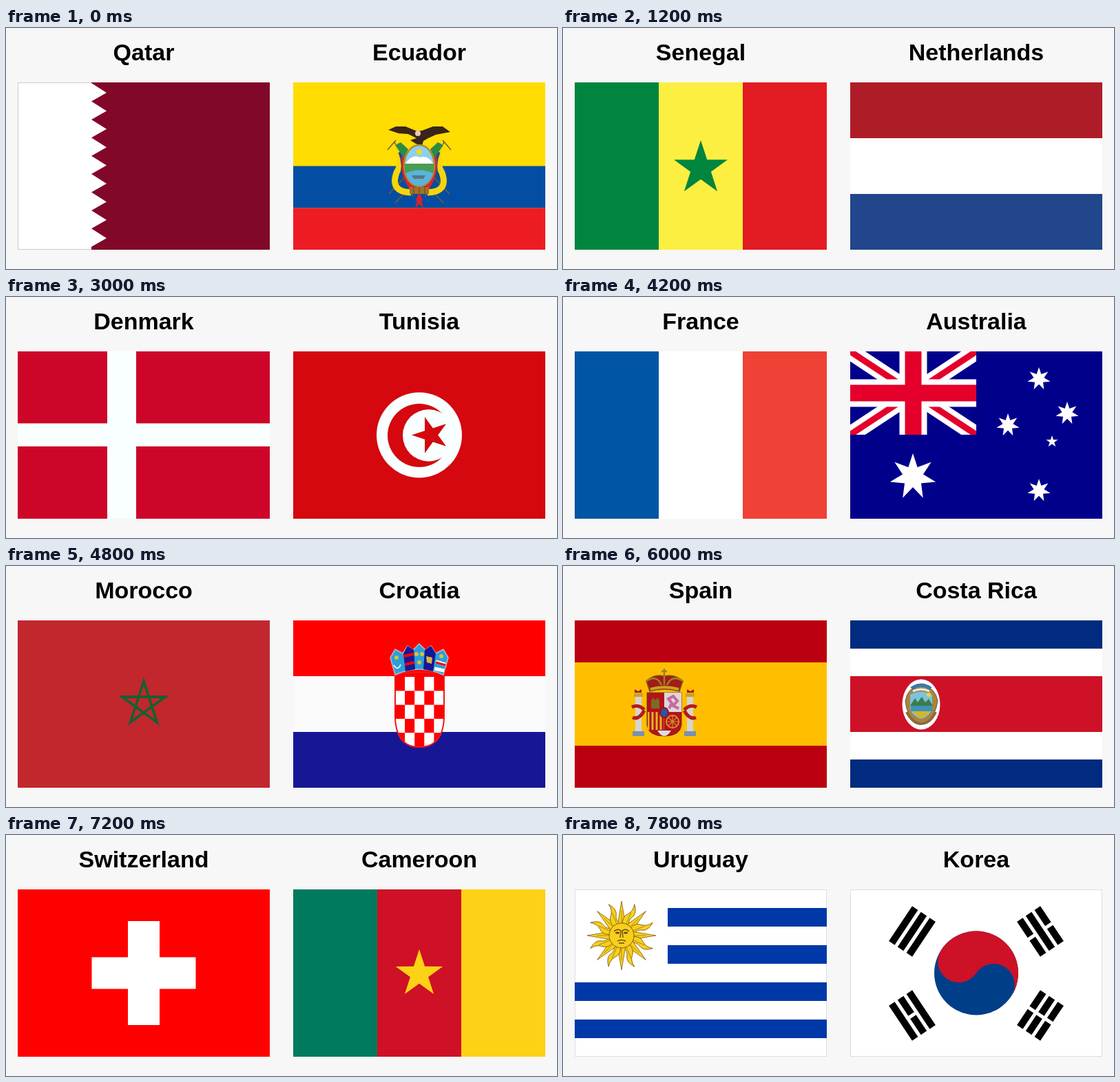
Recreate the animation shown at these times as an HTML page. Size 800x350 px, loop 8000 ms.

```html
<!DOCTYPE html>
<html lang="en">
<head>
<meta charset="utf-8">
<title>Flag pairs</title>
<style>
html, body { margin: 0; width: 100%; height: 100%; overflow: hidden; background: #f7f7f7; }
#stage { display: block; }
text { font: bold 34px "Liberation Sans", Arial, sans-serif; text-anchor: middle; }
</style>
</head>
<body>
<svg id="stage" width="800" height="350" viewBox="0 0 800 350"></svg>
<script>
const W = 366, H = 243, SLIDE = 600, LOOP = 8000;

const rect = (x, y, w, h, fill) => `<rect x="${x}" y="${y}" width="${w}" height="${h}" fill="${fill}"/>`;
const oval = (x, y, rx, ry, fill, stroke = 'none', w = 1) =>
  `<ellipse cx="${x}" cy="${y}" rx="${rx}" ry="${ry}" fill="${fill}" stroke="${stroke}" stroke-width="${w}"/>`;
const circle = (x, y, r, fill, stroke, w) => oval(x, y, r, r, fill, stroke, w);
const path = (d, fill, stroke = 'none', w = 1) => `<path d="${d}" fill="${fill}" stroke="${stroke}" stroke-width="${w}"/>`;
const line = (d, stroke, w) => path(d, 'none', stroke, w);
const group = (transform, s) => `<g transform="${transform}">${s}</g>`;
const mirror = (cx, s) => s + group(`translate(${2 * cx} 0) scale(-1 1)`, s);
const repeat = (n, f) => Array.from({ length: n }, (_, i) => f(i)).join('');
const fill = color => rect(0, 0, W, H, color);
const rows = (...c) => c.map((f, i) => rect(0, i * H / c.length, W, H / c.length + .2, f)).join('');
const cols = (...c) => c.map((f, i) => rect(i * W / c.length, 0, W / c.length + .2, H, f)).join('');
const edge = (color = '#ddd') => `<rect x=".5" y=".5" width="${W - 1}" height="${H - 1}" fill="none" stroke="${color}"/>`;
// Emblems are drawn in stage coordinates of the left or right flag.
const onLeft = s => group('translate(-17 -79)', s);
const onRight = s => group('translate(-417 -79)', s);

function star(x, y, r, color, { turn = -90, n = 5, inner = .382 } = {}) {
  const pts = Array.from({ length: 2 * n }, (_, i) => {
    const a = (turn + i * 180 / n) * Math.PI / 180, k = i % 2 ? r * inner : r;
    return `${(x + k * Math.cos(a)).toFixed(2)},${(y + k * Math.sin(a)).toFixed(2)}`;
  });
  return `<polygon points="${pts.join(' ')}" fill="${color}"/>`;
}

function sun(x, y, scale, color, ink) {
  const rays = ['M-6-15L0-50L6-15Z', 'M-5-16Q-10-26-3-33Q2-39 0-49Q9-38 4-30Q0-24 5-16Z'];
  const face = mirror(0, line('M-2 3L-1-7Q-6-11-11-6', ink, 1.4) + oval(-6, -4, 3, 1.6, ink)) +
    line('M-6 8Q0 5 6 8M-4 11H4', ink, 1.6);
  return group(`translate(${x} ${y}) scale(${scale})`,
    repeat(16, i => group(`rotate(${i * 22.5})`, path(rays[i % 2], color, ink, .7) + line('M0-16V-36', ink, .5))) +
    circle(0, 0, 18, color, ink, .8) + face);
}

const qatarTeeth = 'M366 0H107V1' + repeat(9, i => `L129 ${15 + 26.4 * i}L107 ${27.5 + 26.4 * i}`) + 'V243H366Z';

const ecuadorArms = mirror(600,
    line('M564 165L591 245M554 177L566 163M556 241L590 205M565 254L592 226', '#7a5a34', 1.5) +
    line('M567 168Q579 190 567 210Q557 238 588 239', '#f6d60a', 9) +
    line('M572 180Q580 200 573 218', '#174a94', 5) +
    line('M578 186Q575 218 593 236', '#e0222a', 7) +
    path('M565 170L573 166L584 176L578 189Z', '#2c8a43') + path('M600 238L594 262L605 250Z', '#d8222a')) +
  path('M555 148L566 143L580 143L597 150L604 149L620 143L634 143L645 151L624 155L613 160L606 164L604 171L595 168L587 163L596 160L584 154L570 153Z', '#3a2518') +
  circle(598, 153, 4, '#e9c9bd') +
  oval(600, 200, 22, 30, '#8bd0ee', '#b08a35', 2.5) + circle(600, 180, 4, '#f8d722') +
  path('M579 198Q590 182 601 188Q613 184 621 198Z', '#fff') + path('M579 197H621Q622 211 617 217H583Q578 211 579 197Z', '#4a9c55') +
  path('M580 211Q600 202 620 211Q614 229 600 229Q586 229 580 211Z', '#56b5dd') + path('M589 214H609L606 219H592Z', '#60717d') +
  rect(586, 231, 28, 10, '#a0722c') + line('M592 231V241M600 231V241M608 231V241', '#69471d', 1);

const dragonTail = 'M666 211Q706 208 706 188Q704 172 690 172Q678 174 680 186Q688 193 697 184Q711 178 715 152';
const dragon = line(dragonTail, '#400', 9) + line(dragonTail, '#d30808', 7) + [
  'M721 131L725 174L715 161L694 166Z',
  'M540 147L502 149L483 136L489 156L503 152L540 152Z',
  'M578 228L630 220Q645 235 625 250L608 262L627 281L610 276L603 286L594 275L583 288V275L568 280L580 267L570 264L596 261L606 246Q580 245 578 228Z',
  'M635 205Q690 203 702 240L686 236Q694 250 688 264L704 285L690 277L684 289L674 277L660 290L662 276L650 278L660 266L652 263L676 260Q678 245 660 240Q630 235 635 205Z',
  'M540 218L574 232Q560 248 546 254L540 266L552 284L538 277L532 284L522 275L512 289L511 276L497 280L508 268L497 267L530 265L519 252L530 228Z',
  'M503 134L516 131L531 123L548 122L556 114L555 121L566 111L565 119L574 116L570 126L575 131L567 134L574 143L569 146L576 156L570 159L577 169L571 172L578 182L576 189L640 196Q670 202 680 215L655 230Q628 222 608 236L560 242Q530 238 532 208Q550 190 550 168Q546 152 536 157L540 147L528 142L505 143Z',
  'M542 231Q508 232 496 209L482 219L487 199L481 187L480 173L487 184L491 161L496 183L505 168L501 194Q508 207 524 209L542 198Z',
  'M574 190L590 186L601 150Q620 130 650 115L647 128Q665 128 694 121Q676 132 674 150L684 151Q662 157 660 180Q646 176 645 196Q632 190 626 210L578 214Z'
].map(d => path(d, '#d30808', '#400', 1.4)).join('') +
  line('M590 187L648 128M592 190L675 150M594 195L660 180M597 200L645 196M530 132L542 130M552 158L567 150M553 168L569 162M553 178L571 174M548 188L572 184M538 204L574 195M536 216L572 210M540 228L574 218M575 236Q590 215 608 222M610 232Q622 236 616 244M655 225Q680 222 688 238M520 212L516 229M507 206L500 214M555 250L545 240M620 250L608 240M688 248L674 245', '#400', 1.3);

const checks = repeat(25, i => i % 2 ? rect(565 + i % 5 * 14.1, 161 + Math.floor(i / 5) * 20.3, 14.1, 20.3, '#fff') : '');
const shield = 'M565 158Q600 150 636 158V221Q634 263 600 263Q567 263 565 221Z';
const croatiaArms = `<clipPath id="shield"><path d="${shield}"/></clipPath>` + path(shield, '#f00') +
  `<g clip-path="url(#shield)">${checks}</g>` + line(shield, '#f01818', 2) +
  path('M565 158L558 133L565 121L576 127L583 116L591 122L600 113L609 122L617 116L624 127L635 121L642 133L635 158Q600 142 565 158Z', '#2a9fdc', '#b8b8c8', 1.5) +
  path('M577 127L583 116L592 122L594 150L580 153Z', '#171796') + path('M608 122L617 116L624 127L620 153L606 150Z', '#171796') +
  line('M577 131L592 128M579 143L593 140', '#f00', 4) + line('M624 139L638 143M622 149L636 152', '#fff', 5) + line('M624 140L638 144', '#e00', 3) +
  [[567, 133], [596, 128], [604, 128], [600, 140], [632, 131]].map(([x, y]) => circle(x, y, 3, '#d9c13a')).join('') +
  line('M563 144Q569 153 573 143', '#e8eef4', 2) + path('M610 131L619 133L618 142L611 140Z', '#d9b53a');

const spainArms = mirror(147,
    rect(105, 190, 9, 50, '#d5d5d0') + rect(103, 185, 13, 5, '#c9a227') + rect(101, 240, 17, 7, '#7b8fb0') +
    path('M104 184V179L109 182L114 179V184Z', '#b01818') +
    line('M100 205Q110 200 118 209M118 210Q110 224 101 220', '#b21c1c', 5)) +
  path('M122 184H172V231Q170 247 147 247Q124 247 122 231Z', '#b5121b', '#6b3a18') +
  rect(147, 184, 25, 28, '#ddd6dc') + rect(123, 212, 24, 26, '#e6b422') +
  line('M127 212V240M133 212V243M139 212V245M145 212V246', '#b5121b', 3) +
  path('M128 207V195L131 191L134 195L137 191L140 195V207Z', '#7d6a25') + line('M154 207L158 199L153 193L160 189L166 196L160 203L168 207', '#c9679c', 4) +
  circle(159, 226, 9, 'none', '#d0902c', 2) + line('M150 226H168M159 217V235M153 220L165 232M153 232L165 220', '#d0902c', 1.2) +
  oval(147, 213, 6, 7, '#2c55a8', '#8c1717', 2) + path('M137 239H157Q147 255 137 239Z', '#ddd') +
  path('M126 182L121 167Q133 156 147 160Q161 156 174 167L169 182Q147 176 126 182Z', '#a31c18', '#805b18', 1.5) +
  line('M127 179Q147 173 168 179', '#c9a227', 4) + line('M121 167Q136 157 143 173M174 167Q158 157 151 173M147 173V149M143 153H151', '#9b8026', 2.5);

const costaRicaArms = oval(520, 201, 27.5, 36.5, '#fff') +
  path('M497 196Q500 176 520 173Q541 176 544 196Q541 218 527 228H513Q499 218 497 196Z', '#a88443', '#70582f') +
  path('M504 187Q520 178 536 187V207Q533 218 520 222Q507 218 504 207Z', '#7fc2dd') +
  path('M504 203L511 192L515 198L521 190L526 198L531 193L537 203Z', '#3b7c4d') + rect(505, 203, 31, 8, '#3d94b8') +
  path('M506 211H535L520 222Z', '#d5b62d') + circle(531, 187, 3, '#f2d43a') +
  line('M506 178Q520 168 534 178', '#3977ad', 5) + line('M508 182Q520 176 532 182', '#e9eef0', 3) +
  line('M499 212Q508 229 520 229Q533 229 541 212', '#8a6b38', 4);

const leaf = mirror(600, path('M600.5 117L591 139Q590 142 587 141L576 139L582 178Q582 185 577 181L565 164L562 173Q561 175 558 174L543 172L548 190Q549 194 546 196L541 204L567 228Q571 232 570 237L568 249L595 245Q599 245 598.7 249L598 285H600.5Z', '#f00'));

const trigrams = [[-93, -61, 33.7, '000'], [93, -61, -33.7, '101'], [-93, 61, -33.7, '010'], [93, 61, 33.7, '111']]
  .map(([x, y, turn, bars]) => group(`translate(${183 + x} ${122 + y}) rotate(${turn})`,
    [...bars].map((b, i) => {
      const left = -20.4 + 15.3 * i;
      return +b ? rect(left, -30.5, 10.2, 28, '#000') + rect(left, 2.5, 10.2, 28, '#000') : rect(left, -30.5, 10.2, 61, '#000');
    }).join(''))).join('');

const unionJack = rect(0, 0, 183, 121, '#00008b') + `<svg width="183" height="121">` +
  line('M0 0L183 121M183 0L0 121', '#fff', 24) + line('M0 0L183 121M183 0L0 121', '#e4002b', 9) +
  line('M91.5 0V121M0 60.5H183', '#fff', 40) + line('M91.5 0V121M0 60.5H183', '#e4002b', 24) + '</svg>';

const flags = {
  Qatar: fill('#fff') + edge('#ccc') + path(qatarTeeth, '#820829'),
  Ecuador: fill('#fd0') + rect(0, 121.5, W, 61, '#034ea2') + rect(0, 182.5, W, 60.5, '#ed1c24') + onRight(ecuadorArms),
  England: fill('#fff') + edge() + rect(158.7, 0, 48.6, H, '#ce1124') + rect(0, 97.2, W, 48.6, '#ce1124'),
  Iran: rows('#239f40', '#fff', '#da0000') +
    repeat(22, i => line(`M${i * 17 + 2} 73v6h12v-6M${i * 17 + 8} 72v7M${i * 17 + 2} 170v-6h12v6M${i * 17 + 8} 171v-7`, '#fff', 1.5)) +
    mirror(183, line('M176 100Q158 124 178 145M178 104Q174 126 181 144', '#da0000', 5)) + line('M183 100V149', '#da0000', 5),
  Senegal: cols('#00853f', '#fdef42', '#e31b23') + star(183, 125, 41, '#00853f'),
  Netherlands: rows('#ae1c28', '#fff', '#21468b'),
  USA: fill('#fff') + repeat(7, i => rect(0, i * 37.44 - .8, W, 18.72, '#ce0231')) + rect(0, 0, 150, 130.5, '#071a4e') +
    repeat(48, i => star(12 + i % 8 * 18.2, 12.3 + Math.floor(i / 8) * 21.4, 7.6, '#fff')) + edge('#7777'),
  Wales: fill('#fff') + edge() + rect(0, 121.5, W, 121.5, '#00ad39') + onRight(dragon),
  Argentina: rows('#74acdf', '#fff', '#74acdf') + sun(183, 121.5, .68, '#f6b40e', '#85340a'),
  'Saudi Arabia': fill('#006c35') +
    line('M95 75V125Q110 145 125 120V75M140 70V128H170V92M183 70V130Q200 145 214 120V85M228 70V130H255V95M268 70V128M100 108Q130 92 160 112T225 106T272 110', '#fff', 6) +
    path('M92 171L110 164H262V158H267V164H278V171H267V177H262V171Z', '#fff'),
  Denmark: fill('#cd0529') + rect(130, 0, 42, H, '#f8fffe') + rect(0, 104.5, W, 33.5, '#f8fffe'),
  Tunisia: fill('#d4080e') + circle(183, 121.5, 62, '#f8fffe') + circle(183, 122, 46, '#d4080e') +
    circle(196.7, 122, 37.7, '#f8fffe') + star(199.6, 121.5, 27.7, '#d4080e', { turn: 180 }),
  Mexico: cols('#006847', '#fff', '#ce1126') + path('M160 113Q164 88 186 91L198 101L190 105Q212 110 203 134L181 142L164 132Z', '#8a5a2b') +
    path('M176 139H194L190 149H178Z', '#4a8c3f') + line('M152 124Q155 156 183 156Q211 156 214 124', '#3c7d3c', 5),
  Poland: rows('#fff', '#dc143c') + edge('#ddd8'),
  France: cols('#0055a4', '#fff', '#ef4135'),
  Australia: fill('#00008b') + unionJack +
    [[91, 182, 34], [274, 202, 17], [229, 107, 17], [274, 40, 17], [315, 90, 17]]
      .map(([x, y, r]) => star(x, y, r, '#fff', { n: 7, inner: .45 })).join('') + star(293, 131, 9, '#fff'),
  Morocco: fill('#c1272d') +
    `<path d="M183 88.3l19.4 59.7-50.8-36.9h62.8l-50.8 36.9z" fill="none" stroke="#12612f" stroke-width="3.6" stroke-miterlimit="9"/>`,
  Croatia: rows('#f00', '#fafafa', '#171796') + onRight(croatiaArms),
  Germany: rows('#000', '#d00', '#ffce00'),
  Japan: fill('#fff') + edge() + circle(183, 121.5, 73, '#bc002d'),
  Spain: fill('#bb0011') + rect(0, 61, W, 121, '#ffbf00') + onLeft(spainArms),
  'Costa Rica': fill('#002b7f') + rect(0, 41, W, 161, '#fff') + rect(0, 81, W, 81, '#ce1126') + onRight(costaRicaArms),
  Belgium: cols('#000', '#ffcd05', '#c30040'),
  Canada: fill('#f00') + rect(91.5, 0, 183, H, '#f8fffc') + onRight(leaf),
  Switzerland: fill('#f00') + rect(160, 46, 46, 151, '#fff') + rect(107.5, 98.5, 151, 46, '#fff'),
  Cameroon: cols('#007a5e', '#ce1126', '#fcd116') + star(183, 123, 36, '#fcd116'),
  Uruguay: fill('#fff') + edge() + repeat(4, i => rect(i < 2 ? 135 : 0, 27 + i * 54, W, 27, '#0038a8')) + sun(68, 67, 1, '#f9cf1d', '#6b4a0c'),
  Korea: fill('#fff') + edge() + group('translate(183 121.5) rotate(33.7)',
    circle(0, 0, 61, '#003f87') + path('M-61 0A61 61 0 0 1 61 0A30.5 30.5 0 0 0 0 0A30.5 30.5 0 0 1-61 0Z', '#cd1127')) + trigrams
};

const side = (name, x) => `<text x="${x + W / 2}" y="47">${name}</text>` +
  `<svg x="${x}" y="79" width="${W}" height="${H}">${flags[name]}</svg>`;
const names = Object.keys(flags);
const stage = document.getElementById('stage');
stage.innerHTML = repeat(names.length / 2, i => `<g>${side(names[2 * i], 17)}${side(names[2 * i + 1], 417)}</g>`);
const slides = [...stage.children];

function draw() {
  const current = Math.floor(performance.now() % LOOP / SLIDE);
  slides.forEach((slide, i) => { slide.style.display = i === current ? '' : 'none'; });
  requestAnimationFrame(draw);
}
draw();
</script>
</body>
</html>
```
